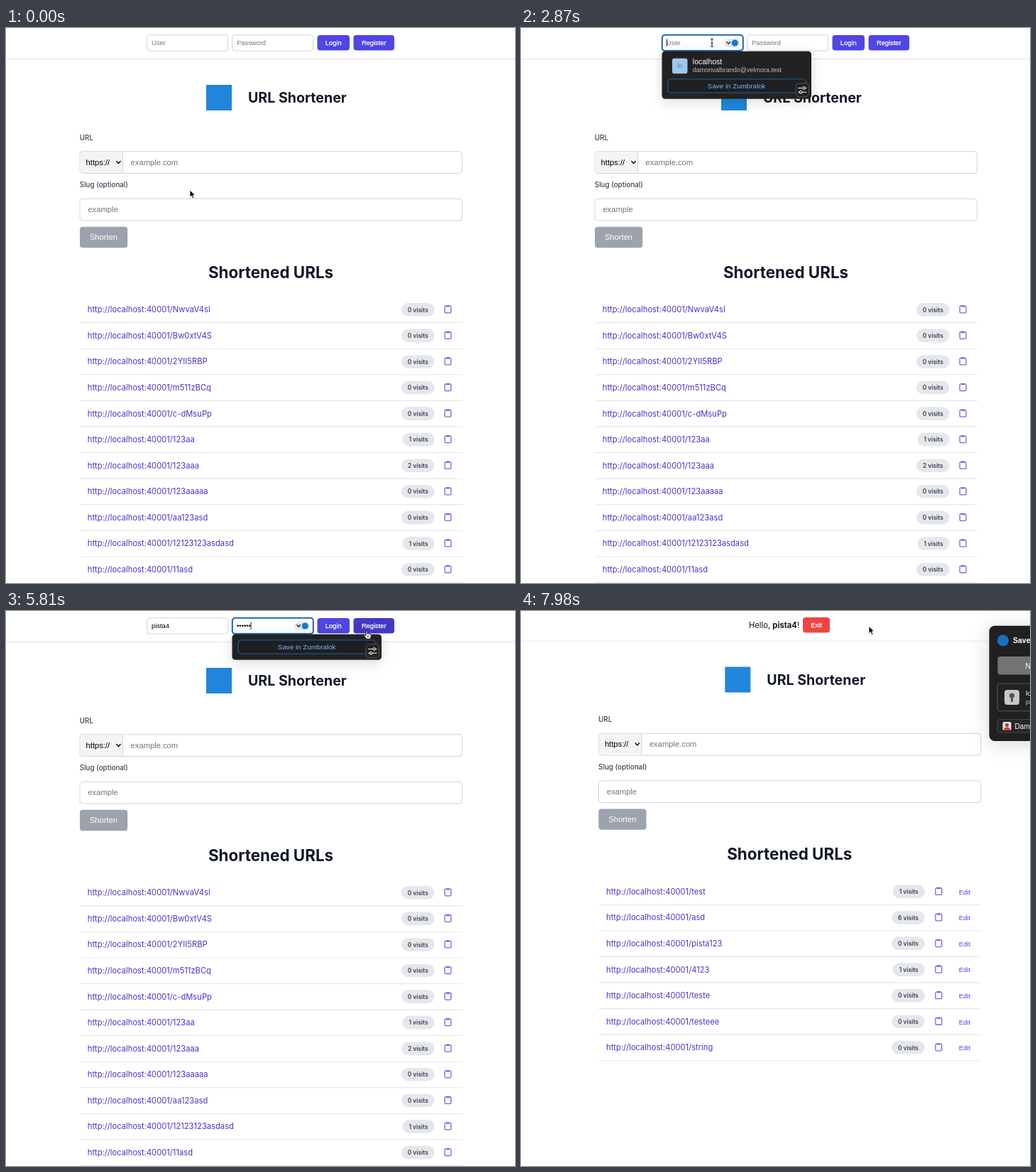
An HTML page that plays this animation: 717 by 781 pixels, repeating every 8 s.

```html
<!DOCTYPE html>
<html lang="en">
<head>
<meta charset="utf-8">
<title>URL Shortener</title>
<style>
  html, body { margin: 0; width: 100%; height: 100%; overflow: hidden; background: #fff; }
  svg { display: block; width: 717px; height: 781px; }
  text { font-family: "Liberation Sans", Arial, sans-serif; white-space: pre; }
  .inter { font-family: Inter, sans-serif; }
  .popup { filter: drop-shadow(0 4px 9px rgba(0, 0, 0, .15)); }
  .dialog { filter: drop-shadow(0 3px 14px rgba(0, 0, 0, .16)); }
</style>
</head>
<body>
<svg viewBox="0 0 717 781">
  <g id="page"></g>
  <g id="live"></g>
</svg>
<script>
const LOOP = 8000, STEP = 70;
const LOGGED_IN = 7070, DIALOG = 7350;
const USER = 'pista4', APP = 'Zumbralok', EMAIL = 'damonvalbrando@velmora.test';
const INDIGO = '#4f46e5', DARK_INDIGO = '#4338ca', INK = '#111827';

const rect = (x, y, w, h, fill, r = 0, extra = '') =>
  `<rect x="${x}" y="${y}" width="${w}" height="${h}" rx="${r}" fill="${fill}" ${extra}/>`;
const line = (d, color, width = 1, extra = '') =>
  `<path d="${d}" fill="none" stroke="${color}" stroke-width="${width}" ${extra}/>`;
const text = (x, y, size, fill, str, extra = '') =>
  `<text x="${x}" y="${y}" font-size="${size}" fill="${fill}" ${extra}>${str}</text>`;
const inter = (x, y, size, fill, str, weight = 400, anchor = 'start') =>
  text(x, y, size, fill, str, `class="inter" font-weight="${weight}" text-anchor="${anchor}"`);
const middle = 'text-anchor="middle"';
const round = 'stroke-linecap="round" stroke-linejoin="round"';
const outline = (color, width = 1) => `stroke="${color}" stroke-width="${width}"`;
const move = (x, y, body) => `<g transform="translate(${x} ${y})">${body}</g>`;

// Page body

const publicRows = [
  ['NwvaV4sl', 0], ['Bw0xtV4S', 0], ['2YII5RBP', 0], ['m511zBCq', 0], ['c-dMsuPp', 0], ['123aa', 1],
  ['123aaa', 2], ['123aaaaa', 0], ['aa123asd', 0], ['12123123asdasd', 1], ['11asd', 0]
];
const ownRows = [
  ['test', 1], ['asd', 6], ['pista123', 0], ['4123', 1], ['teste', 0], ['testeee', 0], ['string', 0]
];

const clipboard = rect(-4.4, -4.3, 8.8, 9.6, 'none', 1.3, outline('#7168e4', 1.3)) +
  rect(-2.4, -5.3, 4.8, 2.4, '#7168e4', .8);

function row([slug, visits], i, own) {
  const right = own ? 563.4 : 603.5;
  const width = visits === 1 ? 45 : 46.5;
  return move(0, i * 36.57,
    inter(114.8, 400.3, 11.2, DARK_INDIGO, 'http://localhost:40001/' + slug) +
    rect(right - width, 387, width, 18.6, '#e5e7eb', 9.3) +
    inter(right - width / 2, 399.5, 8.4, '#374151', visits + ' visits', 600, 'middle') +
    move(own ? 583 : 622.5, 395.5, clipboard) +
    (own ? text(611.4, 400.2, 9.33, INDIGO, 'Edit') : '') +
    line('M104 414.7H643', '#e2e4e9'));
}

function pageBody(own) {
  const field = y => rect(104, y, 538.5, 30.8, '#fff', 4, outline('#d1d5db'));
  return rect(282, 80, 36, 36, '#2185dc') +
    inter(341, 105, 19.6, INK, 'URL Shortener', 700) +
    inter(103.8, 157.8, 9.8, '#374151', 'URL', 500) +
    field(173.7) +
    `<path d="M164.5 174.2H108a3.5 3.5 0 0 0-3.5 3.5V200.500a3.500 3.500 0 0 0 3.500 3.500H164.500Z" fill="#f3f4f6"/>` +
    line('M164.5 174V204', '#d1d5db') +
    text(112.6, 192.8, 11.2, '#000', 'https://') +
    line('M155.800 187.500l2.700 2.900 2.700-2.900', '#111', 1.5, round) +
    text(175.600, 192.8, 11.2, '#757575', 'example.com') +
    inter(103.8, 224.4, 9.8, '#374151', 'Slug (optional)', 500) +
    field(240.3) +
    text(115.4, 259.4, 11.2, '#757575', 'example') +
    rect(104, 279.8, 67.2, 29.4, '#9ca3af', 4) +
    text(137.5, 298.2, 11.2, '#fff', 'Shorten', middle) +
    inter(373, 351.8, 22.4, INK, 'Shortened URLs', 700, 'middle') +
    (own ? ownRows : publicRows).map((r, i) => row(r, i, own)).join('');
}

function drawPage(own) {
  const y = own ? 42.3 : 43.5;
  const header = line(`M0 ${y}H717`, '#e9eaed') + line(`M0 ${y + 1}H717`, '#f7f7f8');
  return header + (own ? move(5.3, -1.4, pageBody(true)) : pageBody(false));
}

// Header controls

const button = (x, y, w, fill, label) => rect(x, y, w, 21.6, fill, 4) +
  text(x + w / 2, y + 14.1, 9.33, '#fff', label, middle + ' stroke="#fff" stroke-width=".25"');

const meter = document.createElement('canvas').getContext('2d');
meter.font = '9.33px "Liberation Sans", Arial, sans-serif';

function input(x, value, placeholder, focused) {
  let out = rect(x, 9.7, 114, 22.4, '#fff', 4, focused ? outline('#1d66b5', 2) : outline('#d1d5db'));
  out += text(x + 6.3, 24, 9.33, value ? '#000' : '#757575', value || placeholder);
  if (!focused) return out;
  const caret = x + 6.6 + meter.measureText(value).width;
  return out + line(`M${caret} 15.5V26`, '#000', .9) +
    rect(x + 87.5, 15, 21.5, 12, '#e3e9ee', 6) +
    line(`M${x + 91} 19.8l2.400 2.400 2.400-2.400`, '#222', 1.3, round) +
    `<circle cx="${x + 102.5}" cy="21" r="4.6" fill="#1579d2"/>`;
}

function popup(x, withEntry) {
  const dy = withEntry ? 31 : 0;
  const entry = rect(14.500, 10, 21.500, 21.500, '#a0c5ef', 3) +
    text(25.2, 23.8, 8.4, '#4a7fbe', 'lo', middle) +
    text(43.3, 18.4, 10.5, '#fff', 'localhost') +
    text(43.3, 29.5, 9, '#bdbdbd', EMAIL);
  const save = rect(8.500, 8.200, 194, 19.200, '#1d1f22', 4, outline('#1f5fa8')) +
    text(105.2, 21.3, 9.8, '#7cbaf5', 'Save in ' + APP, middle) +
    rect(188.500, 14, 18.500, 19, '#232323', 4.5, outline('#565656')) +
    line('M192 20.800H203.500M192 26.500H203.500', '#eee', 1.1, round) +
    `<g fill="#232323" stroke="#eee" stroke-width="1.1"><circle cx="200" cy="20.800" r="1.700"/><circle cx="195.500" cy="26.500" r="1.700"/></g>`;
  return `<g class="popup">${move(x, 32.7, rect(0, 0, 210.500, 36 + dy, '#222', 4.5) +
    (withEntry ? entry : '') + move(0, dy, save))}</g>`;
}

const dialog = '<g class="dialog">' + rect(659.5, 20.7, 240, 162.3, '#202020', 8) + '</g>' +
  '<circle cx="679" cy="41.500" r="8" fill="#1670bd"/>' +
  text(693, 45.3, 10.5, '#fff', 'Save in ' + APP, 'font-weight="bold"') +
  rect(671.5, 64, 200, 25.5, '#747474', 3.5) +
  text(710.5, 80.5, 10.5, '#fff', 'New Item') +
  rect(671, 102.2, 200, 38.600, '#222', 4, outline('#565656')) +
  rect(681, 111, 21, 21, '#c6c8ca', 4) +
  '<circle cx="691.500" cy="119" r="3.600" fill="#555"/>' + rect(690, 120, 3, 8, '#555', 1) +
  text(711, 119.3, 9.8, '#fff', 'localhost') +
  text(711, 130.5, 8.8, '#c4c4c4', USER) +
  rect(671, 152.5, 90, 18.5, '#262626', 4, outline('#484848')) +
  rect(678.500, 156, 12, 12, '#e6dfda', 2) +
  '<circle cx="684.500" cy="160.400" r="2.500" fill="#8c4a3b"/><path d="M680 168q0-4.500 4.500-4.500t4.500 4.500z" fill="#c83f3b"/>' +
  text(695.500, 165.6, 10.2, '#fff', 'Damon');

// Pointer

const path = [
  [0, 259, 228], [1680, 259, 228], [2240, 251, 21], [2520, 269, 20.5], [5250, 269, 20.5],
  [5740, 508, 27.5], [6090, 508, 27.5], [6580, 448, 28], [7140, 448, 28], [7770, 490, 21.500]
];

function pointerAt(t) {
  const i = path.findIndex(p => p[0] > t);
  if (i < 0) return path[path.length - 1].slice(1);
  const [t0, x0, y0] = path[i - 1], [t1, x1, y1] = path[i];
  const u = (t - t0) / (t1 - t0), e = u * u * (3 - 2 * u);
  return [x0 + (x1 - x0) * e, y0 + (y1 - y0) * e];
}

const within = (v, a, b) => v >= a && v < b;

const pointers = {
  arrow: '<path d="M0 0V10.200L2.400 8 4.200 12 6 11.200 4.300 7.300H7.500Z" fill="#000" stroke="#fff" stroke-width=".9"/>',
  beam: line('M-2-5.500Q0-5.500 0-4Q0-5.500 2-5.500M0-4.500V5M-2 6Q0 6 0 4.500Q0 6 2 6M-1.300 1H1.300', '#222', 1),
  hand: '<path d="M-1 1Q0-.4 1.100 1V4.500Q2.300 3.600 3 4.800Q4.200 4.200 4.900 5.400Q6.300 5 6.300 6.800Q6.300 9.300 5.200 11.800H-.4Q-1.800 9.800-3.700 7.300Q-4.100 5.600-2.300 6L-1 7.200Z" fill="#fff" stroke="#111" stroke-width="1"/>'
    + line('M1.300 7V9.800M3.200 7V9.800', '#111', .7)
};

// Scene

const typed = (t, start, step, str) => str.slice(0, Math.max(0, Math.floor((t - start) / step) + 1));

function drawLive(t) {
  const [x, y] = pointerAt(t);
  const overBar = within(y, 9, 32);
  const own = t >= LOGGED_IN;
  const overLogin = !own && overBar && within(x, 438, 484);
  const overRegister = !own && overBar && within(x, 489, 547);
  let out = '';

  if (own) {
    out += inter(321, 24, 11.2, INK, `Hello, <tspan font-weight="700">${USER}</tspan>!`) +
      button(397, 9, 38, '#ef4444', 'Exit');
    if (t >= DIALOG) out += dialog;
  } else {
    const onUser = within(t, 2590, 4200), onPassword = within(t, 4200, 5950);
    const name = typed(t, 3010, 175, USER);
    const secret = typed(t, 4410, 140, '••••••');
    out += input(198.8, name, 'User', onUser) +
      input(318.8, secret, 'Password', onPassword) +
      button(438.5, 10, 45.500, overLogin ? DARK_INDIGO : INDIGO, 'Login') +
      button(489.5, 10, 57.500, overRegister ? DARK_INDIGO : INDIGO, 'Register');
    if (onUser) out += popup(198.5, !name);
    if (onPassword) out += popup(318.5, secret.length < 3);
  }

  const overInput = t > 2310 && !own && overBar && (within(x, 198, 313) || within(x, 318, 433));
  const kind = overLogin || overRegister ? 'hand' : overInput ? 'beam' : 'arrow';
  if (!within(t, 4060, 5250)) out += move(x, y, pointers[kind]);
  return out;
}

const pageLayer = document.getElementById('page');
const liveLayer = document.getElementById('live');
let shownPage, shownTime;

function render(now) {
  const t = Math.floor((now % LOOP) / STEP) * STEP;
  if (t !== shownTime) {
    const own = t >= LOGGED_IN;
    if (own !== shownPage) pageLayer.innerHTML = drawPage(own);
    liveLayer.innerHTML = drawLive(t);
    shownPage = own;
    shownTime = t;
  }
}

const start = performance.now();
function tick() {
  render(performance.now() - start);
  requestAnimationFrame(tick);
}
tick();
</script>
</body>
</html>
```
